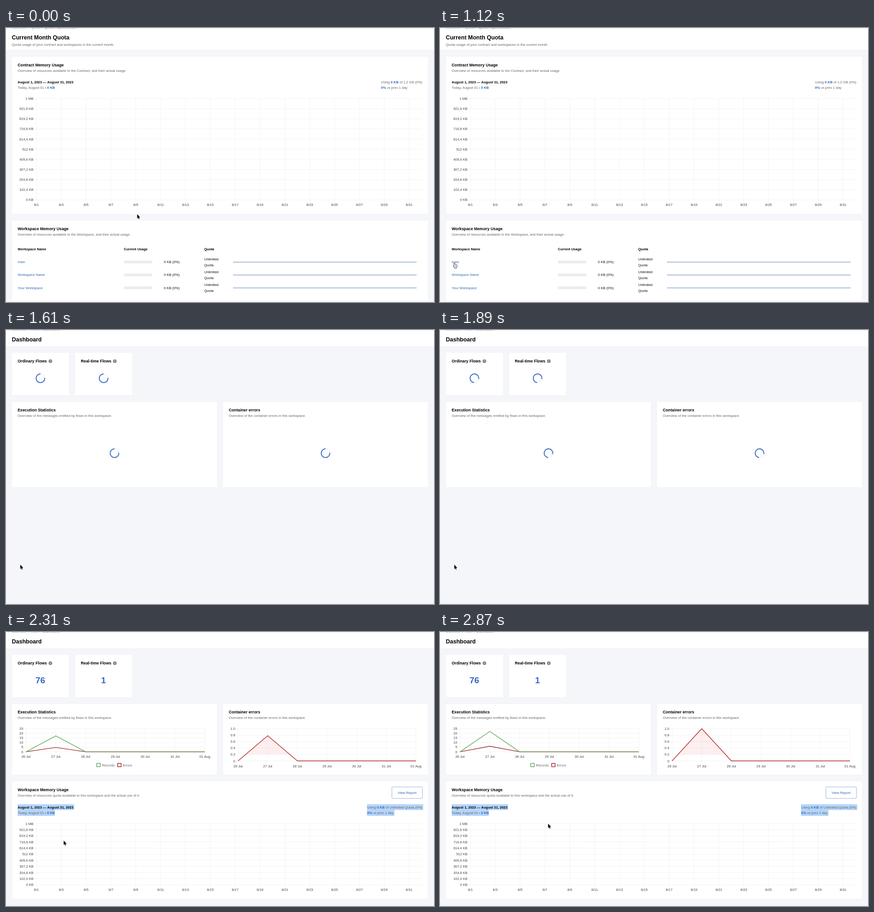
Recreate the animation shown at these times as an HTML page with a canvas. Size 935 by 599 pixels, loop 2.94 s.

```html
<!DOCTYPE html>
<html lang="en">
<head>
<meta charset="utf-8">
<title>Quota dashboard</title>
<style>
  html, body { margin: 0; width: 100%; height: 100%; overflow: hidden; background: #f5f6fa; }
  canvas { display: block; width: 935px; height: 599px; }
</style>
</head>
<body>
<canvas></canvas>
<script>
const W = 935, H = 599, LOOP = 2940, STEP = 70;
const BLUE = '#3069b8', GREY = '#686868', INK = '#444', GREEN = '#5faa62', RED = '#a3282d';
const canvas = document.querySelector('canvas');
const ctx = canvas.getContext('2d');
const dpr = window.devicePixelRatio || 1;
canvas.width = W * dpr;
canvas.height = H * dpr;
ctx.scale(dpr, dpr);

const clamp = v => Math.max(0, Math.min(1, v));
const mix = (a, b, u) => a + (b - a) * u;
const smooth = u => u * u * (3 - 2 * u);

// y is the middle of the capitals
function text(str, x, y, { color = GREY, bold = false, size = 7.5, align = 'left' } = {}) {
  ctx.font = `${bold ? 'bold ' : ''}${size}px "Liberation Sans", Arial, sans-serif`;
  ctx.fillStyle = color;
  ctx.textAlign = align;
  ctx.fillText(str, x, y + size * 0.36);
  return x + ctx.measureText(str).width;
}

const strong = (str, x, y, size = 7.5) => text(str, x, y, { color: '#000', bold: true, size });
const value = (str, x, y) => text(str, x, y, { color: BLUE, bold: true });

function rect(x, y, right, bottom, color) {
  ctx.fillStyle = color;
  ctx.fillRect(x, y, right - x, bottom - y);
}

function line(points, color, width = 1) {
  ctx.beginPath();
  points.forEach(([x, y]) => ctx.lineTo(x, y));
  ctx.strokeStyle = color;
  ctx.lineWidth = width;
  ctx.lineJoin = 'round';
  ctx.stroke();
}

function disc(x, y, r, color) {
  ctx.beginPath();
  ctx.arc(x, y, r, 0, 7);
  ctx.fillStyle = color;
  ctx.fill();
}

function card(x, y, right, bottom) {
  rect(x - 0.6, y - 0.6, right + 0.6, bottom + 0.6, '#edeef2');
  rect(x, y, right, bottom, '#fff');
}

function heading(title, sub, x, y) {
  strong(title, x, y, 8.75);
  text(sub, x, y + 12.7);
}

function page(title, bottom, crumbs) {
  rect(0, 0, W, H, '#f5f6fa');
  rect(0, 0, W, bottom, '#fff');
  rect(0, bottom, W, bottom + 0.7, '#eceef2');
  rect(0, 0, W, 0.5, '#dcdde0');
  crumbs.forEach(([str, x], i) => {
    const last = i === crumbs.length - 1;
    text(str, x, -1.4, { color: last ? GREY : '#3f9be8' });
    if (!last) text('/', crumbs[i + 1][1] - 6, -1.4);
  });
  strong(title, 12.7, 20, 12.5);
}

function grid(xs, ys, left, right, top, bottom) {
  ys.forEach(y => line([[left - 3, y], [right, y]], '#eee', 0.7));
  xs.forEach(x => line([[x, top], [x, bottom + 3]], '#eee', 0.7));
}

function memoryChart(top, bottom, labelY) {
  const xs = Array.from({ length: 16 }, (_, i) => 66.5 + i * 54.27);
  const ys = Array.from({ length: 11 }, (_, i) => mix(bottom, top, i / 10));
  grid(xs, ys, 66.5, 908, top, bottom);
  ys.forEach((y, i) => {
    const amount = (i * 102.4).toFixed(1).replace('.0', '').replace('.', ',');
    text(i === 10 ? '1 MB' : amount + ' KB', 60, y, { color: INK, align: 'right' });
  });
  xs.forEach((x, i) => text('8/' + (2 * i + 1), x, labelY, { color: INK, align: 'center' }));
}

function usageSummary(y, x, quota) {
  strong('August 1, 2023 — August 31, 2023', 25.5, y);
  value('0 KB', text('Today, August 01 • ', 25.5, y + 12.7), y + 12.7);
  let end = value('0 KB', text('Using ', x, y), y);
  text(` of ${quota} (0%)`, end, y);
  end = value('0%', x, y + 12.7);
  text(' vs prev 1 day', end, y + 12.7);
}

function workspaceRow(name, y) {
  const black = { color: '#111' };
  text(name, 25.5, y, { color: BLUE });
  ctx.beginPath();
  ctx.roundRect(257.5, y - 3, 62.5, 6, 3);
  ctx.fillStyle = '#ececec';
  ctx.fill();
  for (let i = 1; i < 4; i++) rect(257.2 + i * 15.6, y - 3, 257.8 + i * 15.6, y + 3, '#f8f8f8');
  text('0 KB (0%)', 345, y, black);
  text('Unlimited', 433, y - 6.4, black);
  text('Quota', 433, y + 6.5, black);
  line([[496, y + 0.3], [897, y + 0.3]], '#5b7dbb', 1);
}

function quotaPage() {
  page('Current Month Quota', 48, [['Business', 13], ['Quota', 55], ['Quota Report Details', 84]]);
  text('Quota usage of your contract and workspaces in the current month.', 12.7, 35.8);
  card(13, 62.5, 922, 406.5);
  heading('Contract Memory Usage', 'Overview of resources available to the Contract, and their actual usage.', 25.5, 80.4);
  usageSummary(118, 819.3, '1,2 GB');
  memoryChart(154.2, 375.7, 386.5);
  card(13, 420.5, 922, 596.5);
  heading('Workspace Memory Usage', 'Overview of resources available to the Workspace, and their actual usage.', 25.5, 438.6);
  strong('Workspace Name', 25.5, 483);
  strong('Current Usage', 257.5, 483);
  strong('Quota', 433, 483);
  ['main', 'Workspace Name', 'Your Workspace'].forEach((name, i) => workspaceRow(name, 511.5 + i * 28.2));
}

function spinner(x, y, t) {
  const a = (t - 1610) / 1000 * 2 * Math.PI;
  ctx.lineWidth = 1;
  ctx.strokeStyle = '#dde3ec';
  ctx.beginPath();
  ctx.arc(x, y, 9.5, 0, 7);
  ctx.stroke();
  ctx.lineWidth = 2;
  ctx.strokeStyle = '#3a6fc0';
  ctx.beginPath();
  ctx.arc(x, y, 9.5, a - 0.1, a + Math.PI * 1.5);
  ctx.stroke();
}

function counter(title, count, x, iconX, t, loaded) {
  card(x, 49.5, x + 124.5, 143);
  strong(title, x + 12.5, 68, 8.75);
  disc(iconX, 68.2, 3.9, '#858585');
  text('i', iconX, 68.2, { color: '#fff', bold: true, size: 6, align: 'center' });
  if (loaded) text(count, x + 62, 105.5, { color: '#3069c4', bold: true, size: 18.75, align: 'center' });
  else spinner(x + 62.2, 105.5, t);
}

// Every series is zero except for its peak on the second day
function weekChart({ left, right, top, bottom, ticks, max, labelY, series, fill }, grow) {
  const xs = Array.from({ length: 7 }, (_, i) => mix(left, right, i / 6));
  const toY = v => mix(bottom, top, v / max);
  grid(xs, ticks.map(toY), left, right, top, bottom);
  ticks.forEach(v => {
    const label = max === 1 && v ? v.toFixed(1) : v;
    text(label, left - 6, toY(v), { color: INK, align: 'right' });
  });
  xs.forEach((x, i) => {
    const day = i < 6 ? 26 + i + ' Jul' : '01 Aug';
    text(day, x, labelY, { color: INK, align: 'center' });
  });
  series.forEach(([peak, color]) => {
    const points = xs.map((x, i) => [x, toY(i === 1 ? peak * grow : 0)]);
    if (fill) {
      ctx.save();
      ctx.beginPath();
      ctx.rect(left, top, right - left, toY(0.2) - top);
      ctx.clip();
      ctx.beginPath();
      points.slice(0, 3).forEach(p => ctx.lineTo(...p));
      ctx.fillStyle = 'rgba(225, 40, 40, 0.07)';
      ctx.fill();
      ctx.restore();
    }
    line(points, color, 1.4);
  });
}

function legend(label, x, color) {
  ctx.strokeStyle = color;
  ctx.lineWidth = 1.5;
  ctx.strokeRect(x, 287.2, 7.6, 7.4);
  text(label, x + 11.3, 291);
}

function dashboard(t) {
  const loaded = t >= 2030;
  const bottom = loaded ? 312.5 : 344;
  page('Dashboard', 36, [['Business', 13], ['main', 54.5], ['Dashboard', 79.5]]);
  counter('Ordinary Flows', '76', 13, 97, t, loaded);
  counter('Real-time Flows', '1', 151, 237.7, t, loaded);
  card(13, 157, 461, bottom);
  heading('Execution Statistics', 'Overview of the messages emitted by flows in this workspace.', 25.5, 175);
  card(474, 157, 922, bottom);
  heading('Container errors', 'Overview of the container errors in this workspace.', 486.7, 175);
  if (!loaded) {
    spinner(237, 269.3, t);
    spinner(698, 269.3, t);
    return;
  }
  const grow = 1 - (1 - clamp((t - 1996) / 1000)) ** 4;
  weekChart({
    left: 43.7, right: 434.3, top: 211.2, bottom: 261.9, max: 25, labelY: 272.5,
    ticks: [0, 5, 10, 15, 20, 25], series: [[6, RED], [22, GREEN]]
  }, grow);
  legend('Records', 198.2, GREEN);
  legend('Errors', 243.9, RED);
  weekChart({
    left: 507, right: 895.5, top: 211.2, bottom: 281.8, max: 1, labelY: 293,
    ticks: [0, 0.2, 0.4, 0.6, 0.8, 1], series: [[1, '#b02a2e']], fill: true
  }, grow);

  card(13, 326.5, 922, 583.5);
  heading('Workspace Memory Usage', 'Overview of resources quota available to this workspace and the actual use of it.', 25.5, 345);
  ctx.beginPath();
  ctx.roundRect(843, 338.8, 66.6, 25, 1.5);
  ctx.lineWidth = 0.8;
  ctx.strokeStyle = '#7c9fd2';
  ctx.stroke();
  text('View Report', 876.3, 351.5, { color: BLUE, size: 7.6, align: 'center' });
  const selected = '#b4d5fb';
  rect(25.5, 376.5, 149, 389.2, selected);
  rect(25.5, 389, 106.7, 402, selected);
  rect(788.6, 376.5, 911.5, 389.2, selected);
  rect(788.6, 389, 848.5, 402, selected);
  usageSummary(382.8, 789, 'Unlimited Quota');
  memoryChart(419, 552.5, 563.5);
}

function shape(x, y, points, fill, stroke, width) {
  ctx.beginPath();
  points.forEach(([px, py]) => ctx.lineTo(x + px, y + py));
  ctx.closePath();
  ctx.lineJoin = 'round';
  ctx.lineWidth = width;
  ctx.strokeStyle = stroke;
  ctx.stroke();
  ctx.fillStyle = fill;
  ctx.fill();
}

const ARROW = [[0, 0], [0, 9.6], [2.1, 7.7], [3.5, 11], [5, 10.4], [3.6, 7.2], [6.5, 7]];
const HAND = [[1.6, 0.4], [2.5, 0.2], [3.1, 0.8], [3.4, 3.4], [5.2, 3.4], [7, 4], [7.9, 4.9], [7.8, 7.4],
  [6.9, 9.3], [6.8, 10.8], [2.9, 10.8], [2.5, 9.6], [0.4, 6.9], [0.2, 5.9], [1, 5.6], [2, 6.4], [1.4, 1.4]];

function cursorAt(t) {
  if (t < 70) return [286.6, 407];
  if (t < 1610) {
    const u = smooth(clamp((t - 280) / 350));
    return [mix(279, 29.6, u), mix(409.5, 514, u)];
  }
  if (t < 2310) {
    const u = clamp((t - 2100) / 210) ** 1.3;
    return [mix(31.2, 126, u), mix(513, 456, u)];
  }
  const u = 1 - (1 - clamp((t - 2310) / 350)) ** 1.8;
  return [mix(126, 236.2, u), mix(456, 419, u)];
}

function cursor(t) {
  const [x, y] = cursorAt(t);
  if (t >= 770 && t < 1120) {
    const u = (t - 770) / 350;
    disc(30, 513, mix(8, 16, u), `rgba(120, 120, 120, ${0.12 * (1 - u)})`);
  }
  if (t >= 1470 && t < 1610) disc(30.5, 513, 22, 'rgba(120, 120, 120, 0.06)');
  if (t >= 770 && t < 1610) {
    shape(x - 0.6, y, HAND, '#fff', '#111', 1.5);
    for (let i = 0; i < 3; i++) line([[x + 2.5 + i * 1.4, y + 6.2], [x + 2.5 + i * 1.4, y + 8.8]], '#333', 0.5);
  } else {
    shape(x, y, ARROW, '#000', '#fff', 1.3);
  }
}

let start;
function frame(now) {
  start ??= now;
  const t = Math.floor(((now - start) % LOOP + 0.5) / STEP) * STEP % LOOP;
  if (t < 1610) quotaPage();
  else dashboard(t);
  cursor(t);
  requestAnimationFrame(frame);
}
requestAnimationFrame(frame);
</script>
</body>
</html>
```
